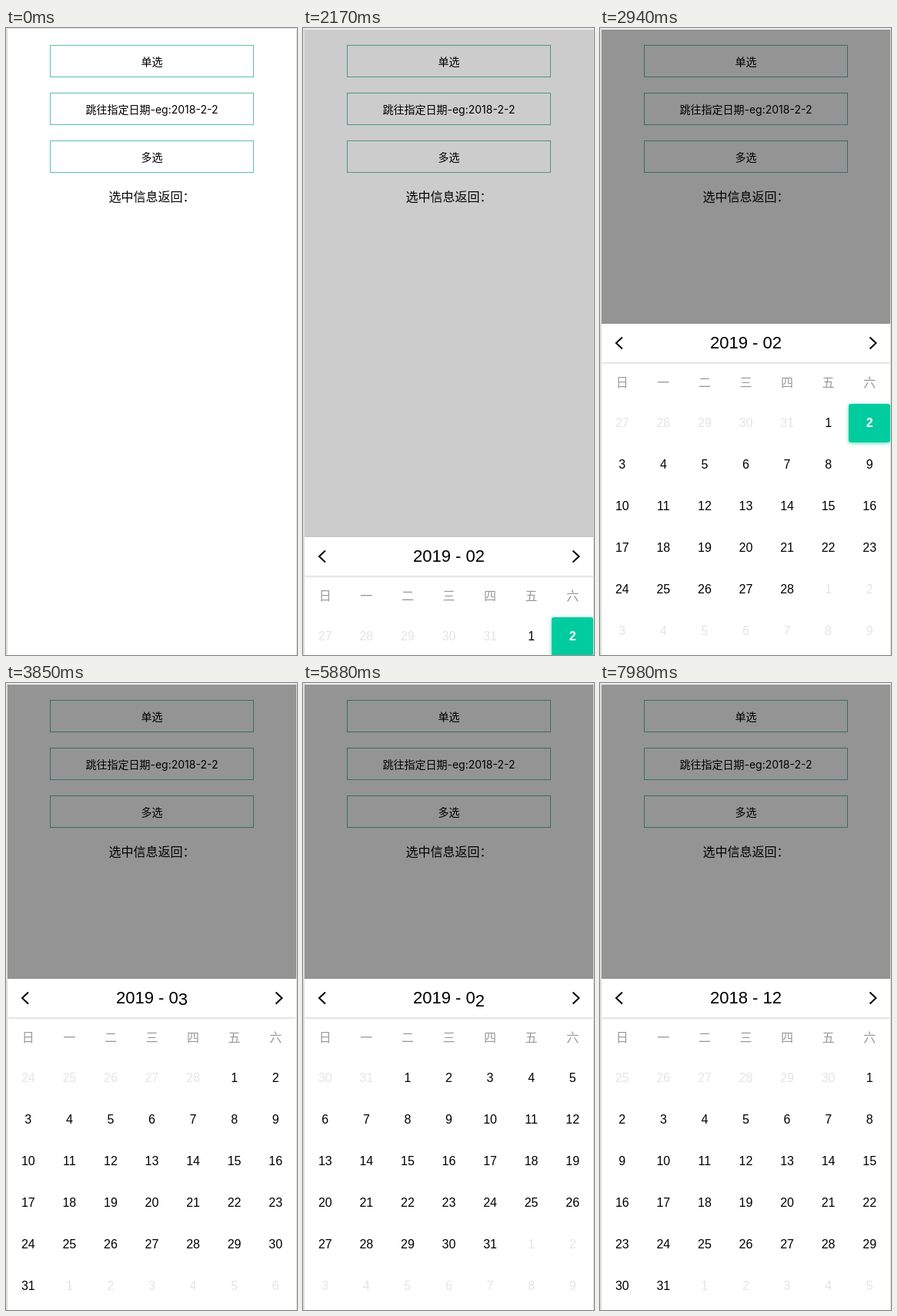
Animation of 378x814 px, one loop 8000 ms. Source, as an HTML page:

```html
<!DOCTYPE html>
<html lang="zh-CN">
<head>
<meta charset="utf-8">
<title>日历</title>
<style>
  html, body { margin: 0; width: 100%; height: 100%; overflow: hidden; background: #fff; }
  body { font-family: Inter, "Noto Sans CJK SC", "Noto Sans CJK", sans-serif; color: #000; }
  #stage { position: absolute; left: 0; top: 0; width: 378px; height: 814px; overflow: hidden; background: #fff; }
  #stage > *, .panel > *, .cell, .digit, .digit span { position: absolute; box-sizing: border-box; }
  .button { left: 57px; width: 265px; height: 42px; border: 1px solid #5cbfab; font-size: 14px; line-height: 41px; text-align: center; }
  .info { left: 2px; width: 375px; top: 207px; font-size: 16px; line-height: 24px; text-align: center; }
  .mask { left: 2px; top: 2px; width: 375px; height: 812px; background: rgba(0, 0, 0, .42); }
  .panel { left: 2px; top: 384px; width: 375px; height: 430px; background: #fff; font-family: "Liberation Sans", Arial, sans-serif; }
  .bar { left: 0; top: 0; width: 375px; height: 50px; box-shadow: 0 1px 3px rgba(0, 0, 0, .2); }
  .title { left: 141px; top: 12px; width: 94px; height: 25px; font-size: 22px; line-height: 25px; white-space: pre; }
  .digit { top: 0; width: 12.24px; height: 25px; overflow: hidden; }
  .digit span { left: 0; top: 0; }
  .dash { position: absolute; left: 48.94px; }
  .arrows { left: 0; top: 0; }
  .cell { width: 53.57px; height: 50px; font-size: 16px; line-height: 50px; text-align: center; }
  .week { color: #999; font-family: "Noto Sans CJK SC", "Noto Sans CJK", sans-serif; }
  .other { color: #e4e4e4; }
  .picked { color: #fff; font-weight: bold; background: #00cc9f; border-radius: 3px; box-shadow: 0 1px 5px rgba(0, 204, 159, .7); }
  .frame { left: 0; top: 0; width: 378px; height: 816px; border: 1px solid #dcdcdc; border-left-width: 2px; border-radius: 2px; }
</style>
</head>
<body>
<div id="stage">
  <div class="button" style="top:22px">单选</div>
  <div class="button" style="top:84px">跳往指定日期-eg:2018-2-2</div>
  <div class="button" style="top:146px">多选</div>
  <div class="info">选中信息返回：</div>
  <div class="mask"></div>
  <div class="panel">
    <div class="bar"></div>
    <div class="title"><span class="dash"> - </span></div>
    <svg class="arrows" width="375" height="50" fill="none" stroke="#000" stroke-width="2">
      <path d="M27 17.5L19 25L27 32.5M348.500 17.5L356.500 25L348.500 32.5"/>
    </svg>
    <div class="grid"></div>
  </div>
  <div class="frame"></div>
</div>
<script>
const LOOP = 8000, LINE = 25, COL = 375 / 7;
const $ = s => document.querySelector(s);
const clamp = x => Math.min(1, Math.max(0, x));
const outQuart = x => 1 - (1 - x) ** 4;
const inOutCubic = x => x < .5 ? 4 * x ** 3 : 1 - 4 * (1 - x) ** 3;

const open = { at: 2100, slide: 680, fade: 150 };
// start, year, month
const months = [[0, 2019, 2], [3285, 2019, 3], [5035, 2019, 2], [5665, 2019, 1], [6295, 2018, 12]];
// slot, start, duration, change
const rolls = [
  [5, 3290, 760, 1],
  [5, 5040, 620, -1],
  [5, 5670, 600, -1],
  [3, 6300, 700, -1],
  [4, 6300, 625, 1],
  [5, 6750, 320, 1]
];
const first = [2, 0, 1, 9, 0, 2];

function add(parent, cls, text = '') {
  const el = document.createElement(cls ? 'div' : 'span');
  if (cls) el.className = cls;
  el.textContent = text;
  return parent.appendChild(el);
}

function addCell(parent, cls, text, col, top) {
  const el = add(parent, 'cell ' + cls, text);
  el.style.left = col * COL + 'px';
  el.style.top = top + 'px';
  return el;
}

const digits = first.map((_, i) => {
  const box = add($('.title'), 'digit');
  box.style.left = i * 12.235 + (i > 3 ? 19.56 : 0) + 'px';
  return [add(box), add(box)];
});

[...'日一二三四五六'].forEach((day, i) => addCell($('.panel'), 'week', day, i, 50));
const cells = Array.from({ length: 42 }, (_, i) =>
  addCell($('.grid'), '', '', i % 7, 104 + 54 * Math.floor(i / 7)));

let shown = null;
function showMonth(entry) {
  if (entry === shown) return;
  shown = entry;
  const [, year, month] = entry;
  const lead = new Date(year, month - 1, 1).getDay();
  cells.forEach((cell, i) => {
    const date = new Date(year, month - 1, 1 - lead + i);
    const inside = date.getMonth() === month - 1;
    const picked = inside && year === 2019 && month === 2 && date.getDate() === 2;
    cell.textContent = date.getDate();
    cell.className = 'cell' + (picked ? ' picked' : inside ? '' : ' other');
  });
}

function showDigits(t) {
  const values = first.slice();
  for (const [slot, at, span, change] of rolls)
    values[slot] += change * inOutCubic(clamp((t - at) / span));
  digits.forEach((pair, i) => pair.forEach((el, k) => {
    const n = Math.floor(values[i]) + k;
    el.textContent = n % 10;
    el.style.transform = `translateY(${(n - values[i]) * LINE}px)`;
  }));
}

function draw() {
  const t = performance.now() % LOOP;
  const slide = outQuart(clamp((t - open.at) / open.slide));
  $('.mask').style.opacity = clamp((t - open.at) / open.fade);
  $('.panel').style.transform = `translateY(${Math.round((1 - slide) * 430)}px)`;
  $('.panel').style.visibility = slide > 0 ? 'visible' : 'hidden';
  showMonth(months.filter(m => m[0] <= t).pop());
  showDigits(t);
  requestAnimationFrame(draw);
}
draw();
</script>
</body>
</html>
```
